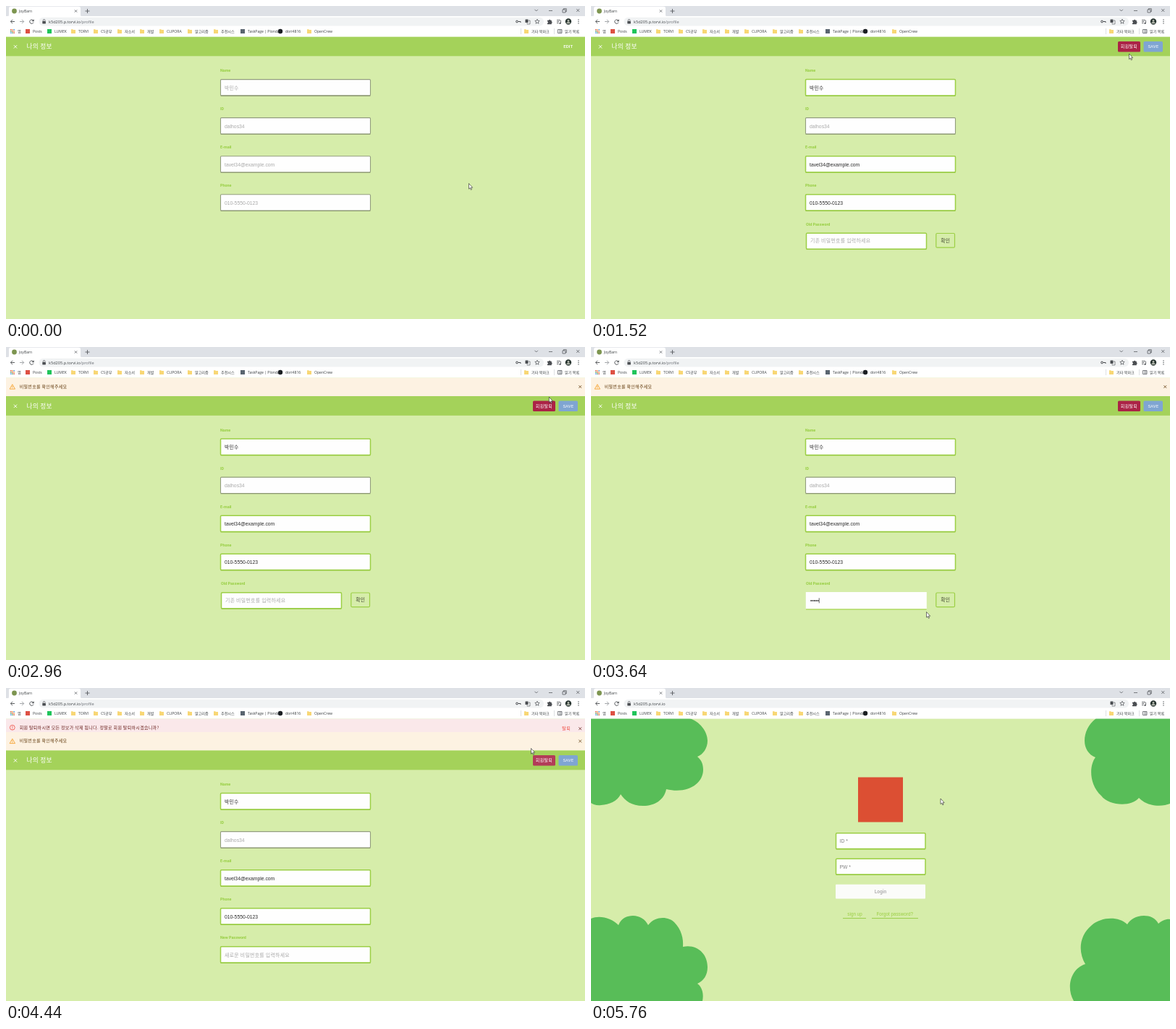
Recreate the animation shown at these times as an HTML page. Size 800 px wide and 433 px high, loop 5800 ms.

```html
<!DOCTYPE html>
<html>
<head>
<meta charset="utf-8">
<title>Profile</title>
<style>
html, body { margin: 0; width: 100%; height: 100%; overflow: hidden; background: #d6edaa; }
svg { display: block; width: 100vw; height: 100vh; }
text { white-space: pre; }
.ui { font-family: "Open Sans", "Noto Sans CJK KR", "Noto Sans CJK JP", sans-serif; }
.ko { font-family: "Noto Sans CJK KR", "Noto Sans CJK JP", sans-serif; letter-spacing: .3px; }
.in { font-family: "Liberation Sans", "Noto Sans CJK KR", Arial, sans-serif; }
.lb { font-family: Roboto, "Noto Sans CJK KR", sans-serif; }
.b { font-weight: 700; }
.m { font-weight: 500; }
.mid { text-anchor: middle; }
</style>
</head>
<body>
<svg id="stage" viewBox="0 0 800 433" preserveAspectRatio="none"></svg>
<script>
const LOOP = 5800, STEP = 40, TOP = 42.5;
const GREEN = '#a4d25a', LIME = '#9ccf45', PAGE = '#d6edaa';

const rect = (x, y, w, h, fill, more = '') =>
  `<rect x="${x}" y="${y}" width="${w}" height="${h}" fill="${fill}" ${more}/>`;
const dot = (x, y, r, fill, more = '') => `<circle cx="${x}" cy="${y}" r="${r}" fill="${fill}" ${more}/>`;
const line = (d, color, w = .8, more = '') =>
  `<path d="${d}" fill="none" stroke="${color}" stroke-width="${w}" ${more}/>`;
const shape = (d, fill, more = '') => `<path d="${d}" fill="${fill}" ${more}/>`;
// y is the optical middle of the line
const text = (x, y, size, fill, str, cls = 'ui') =>
  `<text x="${x}" y="${y + size * .36}" font-size="${size}" fill="${fill}" class="${cls}">${str}</text>`;
const group = (id, ...parts) => `<g id="${id}">${parts.join('')}</g>`;
const cross = (x, y, r, color, w) =>
  line(`M${x - r} ${y - r}l${2 * r} ${2 * r}m0 ${-2 * r}l${-2 * r} ${2 * r}`, color, w);

// ---------- browser frame ----------
const folder = (x) => shape(`M${x} 32.2h2.2l.8.9h3v5h-6z`, '#f8d775');
const mark = (x, color) => rect(x, 32, 6, 6, color);

function bookmarks() {
  const ink = '#3c4043';
  const items = [
    [16, '앱'], [37, 'Posts', '#dd5144'], [67, 'LUMEK', '#1fc45a'], [100, 'TORVI'], [131, 'CS공부'],
    [164, '자소서'], [195, '개발'], [222, 'CLIPORA'], [261, '알고리즘'], [297, '추천시스'],
    [334, 'TaskPage | Plonda', '#5a6570'], [386, 'dori4816', 'round'], [426, 'OpenCrew'], [726, '기타 북마크']
  ];
  let out = '';
  for (const [x, name, icon] of items) {
    if (icon === 'round') out += dot(x - 7, 35, 3.2, '#1b1f23');
    else if (icon) out += mark(x - 10, icon);
    else if (x > 16) out += folder(x - 10);
    out += text(x, 35, 5.1, ink, name);
  }
  const tints = ['#e25041', '#e9a13b', '#4b8df0', '#47a85a'];
  for (let i = 0; i < 9; i++)
    out += rect(6 + (i % 3) * 2.2, 32 + Math.floor(i / 3) * 2.2, 1.5, 1.5, tints[i % 4]);
  out += line('M711.5 31v8M757.5 31v8', '#c8ccd0', .6);
  out += line('M762.5 32.5h5.5v5h-5.5zM765 32.5v5M766 34h1.5M766 36h1.5', '#5f6368', .8);
  return out + text(772, 35, 5.1, ink, '읽기 목록');
}

function chrome() {
  const ink = '#4a4d51';
  return [
    rect(0, 0, 800, 14.5, '#dee1e6'),
    rect(0, 14, 800, 28.5, '#fff'),
    shape('M2 14.5Q4 14.5 4 12V3Q4 .8 6.5 .8H100.500Q103 .8 103 3V12Q103 14.500 105 14.500Z', '#fff'),
    dot(11.5, 7, 3.4, '#7d9550', 'id="fav"'),
    text(18, 7, 5.1, '#3c4043', 'JoyBarn'),
    cross(96.5, 7, 1.7, ink, .7),
    line('M109.500 7h6M112.500 4v6', ink),
    line('M730.500 4.800l2.200 2.200l2.200 -2.200M750 6.500h5', ink, .7),
    line('M769 5h4v4h-4zM770.300 5v-1.300h4v4h-1.300', ink, .7),
    cross(790.3, 6, 2, ink, .7),
    line('M12 21.500H6.500M9 18.800L6.300 21.500L9 24.200', ink, .9),
    line('M19 21.500H24.500M22 18.800L24.700 21.500L22 24.200', '#9a9da1', .9),
    group('reload', line('M37.800 20.300A2.700 2.700 0 1 0 38 22.600', ink, .9), shape('M38.600 18.300v2.900h-2.900z', ink)),
    group('halt', cross(35.5, 21.5, 2.3, ink, .9)),
    rect(45.5, 15.8, 697.5, 11.6, '#f1f3f4', 'rx="5.800"'),
    rect(50.3, 21, 4.6, 3.4, ink, 'rx=".4"'),
    line('M51.300 21v-1.200a1.300 1.300 0 0 1 2.600 0V21', ink, .7),
    text(59, 21.5, 5.6, '#3c4043', 'k5d205.p.torvi.io<tspan id="path" fill="#6b6f74">/profile</tspan>'),
    group('key', dot(706, 21.5, 1.4, 'none', `stroke="${ink}"`), line('M707.500 21.500h3.500v1.500', ink, 1)),
    rect(717.5, 18.5, 4, 4.6, ink, 'rx=".5"'),
    line('M722 20h2v5h-4v-1.500', ink, .6),
    shape('M734 18.200l.9 2.100 2.300.2-1.800 1.500.6 2.300-2-1.300-2 1.300.6-2.300-1.800-1.500 2.300-.2z', 'none', `stroke="${ink}" stroke-width=".7"`),
    shape('M748 19.700h2a1.200 1.200 0 0 1 2.300 0h1.500v1.800a1.200 1.200 0 0 1 0 2.300v1.400H748v-1.600a1 1 0 0 0 0-2.100z', ink),
    line('M761 19.500h5M761 21.500h3.500M761 23.500h2.500M766.500 20v4', ink, .8),
    dot(765.5, 24, 1.1, ink),
    dot(777, 21.5, 4.2, '#26332f'),
    dot(777, 20.4, 1.4, '#b5b9ae'),
    shape('M774.300 24.300a2.700 2.300 0 0 1 5.400 0z', '#b5b9ae'),
    [19, 21.5, 24].map(y => dot(791, y, .7, ink)).join(''),
    bookmarks()
  ].join('');
}

// ---------- profile page ----------
const box = (x, y, w, h, off) =>
  rect(x, y, w, h, '#fefefe', `rx="1.200" stroke="${off ? '#929d7c' : LIME}" stroke-width="${off ? 1.1 : 1.5}"`) +
  line(`M${x} ${y + h + .4}h${w}`, off ? '#87946b' : '#93c83d', .9);

const label = (x, y, str) => text(x, y, 5.4, '#97ce42', str, 'lb b');

const ROWS = [['Name', '박민수'], ['ID', 'dalhos34'], ['E-mail', 'tavel34@example.com'], ['Phone', '010-5550-0123']];
const rows = editing => ROWS.map(([name, value], i) => {
  const y = i * 53.05, off = !editing || name === 'ID';
  return label(296, 89.3 + y, name) + box(296.5, 101.6 + y, 207, 22.3, off) +
    text(302, 113.3 + y, 6.8, off ? '#a9a9a9' : '#2b2b2b', value, i ? 'in' : 'ko');
}).join('');

const button = (id, x, w, fill, ink, str, cls) =>
  rect(x, 49, w, 14.6, fill, `rx="1.600" id="${id}"`) + text(x + w / 2, 56.2, 6, ink, str, cls + ' mid');

function profile() {
  const dots = [0, 1, 2, 3, 4].map(i => dot(304.2 + i * 2.35, 325.4, .95, '#222', 'class="pw"')).join('');
  return group('profile',
    rect(0, TOP, 800, 433, PAGE),
    rect(0, TOP, 800, 26.8, GREEN),
    cross(13, 56.3, 2.2, '#fff', .9),
    text(28.5, 56, 8.7, '#fff', '나의 정보', 'ko'),
    group('view',
      rect(763, 49, 27, 14.6, '#000', 'rx="1.600" id="editHover" opacity=".05"'),
      text(776.7, 56.2, 6.2, '#fff', 'EDIT', 'lb m mid'),
      rows(false)),
    group('edit',
      button('leave', 728, 31, '#ab2346', '#fff', '회원탈퇴', 'ko m'),
      button('save', 763.5, 26.5, '#7fa5d2', '#dfe8f2', 'SAVE', 'lb m'),
      rows(true),
      group('oldPw',
        label(297, 301.7, 'Old Password'),
        group('idleBox', box(297.5, 314.2, 166, 22, false)),
        group('focusBox', rect(296.8, 313.5, 167, 23, '#fefefe'), line('M297 337.500h166.500', LIME, .9)),
        text(303, 325, 6.9, '#a9a9a9', '<tspan id="hint">기존 비밀번호를 입력하세요</tspan>', 'ko'),
        dots,
        rect(0, 321.8, .7, 7, '#222', 'id="caret"'),
        rect(476.8, 314.5, 25.700, 19.700, PAGE, `rx="1.500" stroke="${LIME}" stroke-width="1.200"`),
        text(489.8, 324.2, 6.8, '#3a3f2c', '확인', 'ko mid')),
      group('newPw',
        label(296, 301.4, 'New Password'),
        box(296.5, 313.8, 207, 22.3, false),
        text(302, 325.2, 6.9, '#a9a9a9', '새로운 비밀번호를 입력하세요', 'ko'))));
}

const alerts = () =>
  group('red',
    rect(0, TOP, 800, 25.5, '#fae8ea'),
    dot(8.8, 54.7, 3.4, 'none', 'stroke="#f0483e" stroke-width=".8"'),
    line('M8.800 52.700v2.500M8.800 56v.9', '#f0483e', .8),
    text(18.7, 54.5, 6, '#6b231f', '회원 탈퇴하시면 모든 정보가 삭제 됩니다. 정말로 회원 탈퇴하시겠습니까?', 'ko'),
    rect(761, 49, 26, 15, '#e6d5d7', 'rx="1.500" id="quitHover"'),
    text(774.2, 56.3, 6.1, '#f0483e', '탈퇴', 'ko mid'),
    cross(793.3, 56.2, 1.9, '#6b231f', .8)) +
  group('yellow',
    rect(0, TOP, 800, 25.5, '#fdf2e2'),
    shape('M8.800 51.700l3.700 6.400h-7.400z', 'none', 'stroke="#f59a1b" stroke-width=".8"'),
    line('M8.800 53.900v2.100M8.800 56.600v.8', '#f59a1b', .8),
    text(18.7, 54.8, 6, '#664014', '비밀번호를 확인해주세요', 'ko'),
    cross(793.3, 55, 1.9, '#664014', .8));

// ---------- login page ----------
const TREES = [
  'M0 42H136C150 46 161 60 161 73C161 83 155 92 147 95C153 100 155 106 155 113C155 132 134 147 104 140C101 155 88 163 72 163C56 163 47 156 41 147C36 157 25 161 14 162C8 163 3 161 0 159Z',
  'M800 42H698C687 50 682 62 682 73C682 83 687 92 697 96C689 106 687 132 705 149C715 163 747 165 757 152C770 165 790 164 800 160Z',
  'M0 319C12 314 28 318 38 328C42 318 50 315 58 315C67 315 75 320 79 328C90 314 108 317 115 324C125 334 128 347 127 358C147 354 161 368 161 386C161 397 156 405 147 409C154 414 156 424 154 433H0Z',
  'M800 320C796 319 788 322 784 326C780 318 772 315 764 315C753 315 745 320 741 327C728 315 705 317 692 328C674 343 673 365 683 382C663 388 656 414 667 433H800Z'
];

const login = () => group('login',
  rect(0, TOP, 800, 391, PAGE),
  TREES.map(d => shape(d, '#58bd58')).join(''),
  rect(369, 123.5, 62, 62, '#dc4f33'),
  box(338.5, 200.8, 123.5, 21.800, false), text(343.5, 211.8, 6.8, '#808080', 'ID *', 'in'),
  box(338.5, 236.2, 123.5, 21.800, false), text(343.5, 247.3, 6.8, '#808080', 'PW *', 'in'),
  rect(338, 271.8, 124, 19.8, '#fbfcf9', 'rx="1"'),
  text(400, 281.700, 6.6, '#b3b3b3', 'Login', 'lb b mid'),
  text(364.5, 312.3, 6.3, LIME, 'sign up', 'in mid'),
  text(419.700, 312.3, 6.3, LIME, 'Forgot password?', 'in mid'),
  line('M348 318.600h32M388 318.600h64', '#93cb3f', .9));

const pointer = () => group('cursor',
  group('arrow', shape('M0 0V7.600L1.700 6.100L2.900 8.800L4 8.300L2.900 5.700H5.200Z', '#fff', 'stroke="#222" stroke-width=".6"')),
  group('hand', shape('M-.8 .6Q0 -.5 .8 .6V3.400Q1.700 2.900 2.200 3.600Q3 3.200 3.400 4Q4.300 3.800 4.400 4.700V6.700Q4.300 8 3.600 9.200H-.4Q-1.400 7.500 -2.800 5.800Q-2.700 4.700 -1.600 5.300L-.8 6Z', '#fff', 'stroke="#222" stroke-width=".6"')),
  group('beam', line('M-1.500 -4h3M0 -4v8M-1.500 4h3', '#333', .7)));

const stage = document.getElementById('stage');
stage.innerHTML = alerts() + profile() + login() + chrome() + pointer();

// ---------- motion ----------
// time, x, y, pointer kind from that time on
const PATH = [
  [0, 639.5, 245.5, 'arrow'], [240, 646, 238, 'arrow'], [600, 718, 160, 'arrow'],
  [960, 776, 57, 'hand'], [1320, 776, 57, 'hand'], [1360, 774, 58, 'arrow'],
  [1520, 743.5, 66, 'arrow'], [2000, 744, 66, 'arrow'], [2240, 751, 63.5, 'hand'],
  [2840, 751, 64, 'arrow'], [3040, 750, 72, 'arrow'], [3280, 440, 348, 'beam'],
  [3560, 442, 350, 'beam'], [3640, 463.5, 366.5, 'arrow'], [3760, 488, 349, 'hand'],
  [3880, 488, 349, 'arrow'], [4200, 742, 80, 'hand'], [4360, 742, 80, 'arrow'],
  [4440, 725.5, 83.5, 'arrow'], [4840, 726, 84, 'arrow'], [5120, 778, 63.5, 'hand'],
  [5600, 778, 63.5, 'hand'], [5640, 750, 73, 'arrow'], [5760, 483, 153, 'arrow']
];
const clamp = v => Math.min(1, Math.max(0, v));
const smooth = u => u * u * (3 - 2 * u);
const grow = (t, start) => { const u = clamp((t - start) / 190); return 1 - (1 - u) ** 2 * (1 + .26 * u); };

const el = id => document.getElementById(id);
const show = (id, on) => el(id).setAttribute('display', on ? 'inline' : 'none');
const move = (id, x, y) => el(id).setAttribute('transform', `translate(${x} ${y})`);
const within = (t, a, b) => t >= a && t < b;
const bullets = [...document.querySelectorAll('.pw')];

function pointAt(t) {
  let i = PATH.length - 1;
  while (PATH[i][0] > t) i--;
  const a = PATH[i], b = PATH[i + 1] || a;
  const u = b === a ? 0 : smooth((t - a[0]) / (b[0] - a[0]));
  return [a[1] + (b[1] - a[1]) * u, a[2] + (b[2] - a[2]) * u, a[3]];
}

function draw(t) {
  const editing = t >= 1360, changed = t >= 3840, home = t >= 5640;
  const redY = 22 * grow(t, 4320), yellowY = 25.5 * grow(t, 2760);
  show('red', t >= 4320);
  show('yellow', t >= 2760);
  move('yellow', 0, redY);
  move('profile', 0, redY + yellowY);
  show('view', !editing);
  show('edit', editing);
  show('oldPw', !changed);
  show('newPw', changed);
  show('login', home);

  const focused = within(t, 3280, 3840), typed = focused ? Math.min(5, Math.max(0, Math.floor((t - 3280) / 56))) : 0;
  show('idleBox', !focused);
  show('focusBox', focused);
  show('hint', !typed);
  bullets.forEach((b, i) => b.setAttribute('display', i < typed ? 'inline' : 'none'));
  show('caret', focused);
  el('caret').setAttribute('x', 303 + typed * 2.36);

  show('editHover', within(t, 960, 1360));
  show('quitHover', t >= 5080);
  el('leave').setAttribute('fill', within(t, 4320, 4960) ? '#b23c58' : '#ab2346');

  const loading = within(t, 5560, 5680);
  show('halt', loading);
  show('reload', !loading);
  el('fav').setAttribute('r', loading ? 2.6 : 3.4);
  show('path', t < 5560);
  show('key', t < 5560);

  const [x, y, kind] = pointAt(t);
  move('cursor', x, y);
  for (const k of ['arrow', 'hand', 'beam']) show(k, k === kind);
}

const began = performance.now();
function tick() {
  const t = (performance.now() - began) % LOOP;
  draw(Math.floor(t / STEP) * STEP);
  requestAnimationFrame(tick);
}
draw(0);
requestAnimationFrame(tick);
</script>
</body>
</html>
```
